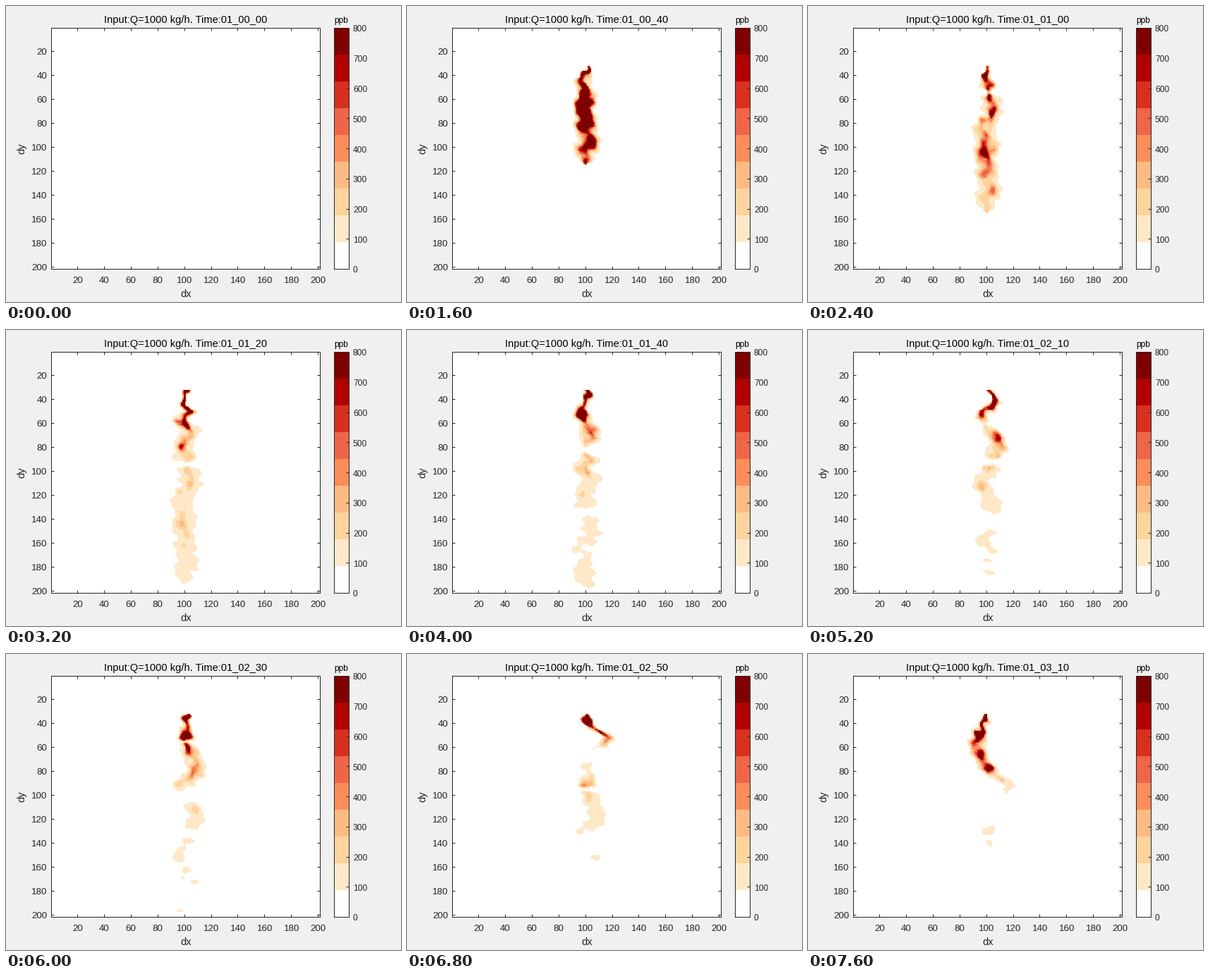
Write a matplotlib script that moves like this. It is 560 px wide and 420 px high and loops after 8000 ms.

```python
import numpy as np
import matplotlib.pyplot as plt
from matplotlib.animation import FuncAnimation
from matplotlib.colors import ListedColormap

W, H, DPI = 560, 420, 100
FRAMES, INTERVAL = 20, 400
SECONDS_PER_FRAME = 10
LEFT, RIGHT, TOP, BOTTOM = 64, 445, 31, 373
CELLS = 201
SOURCE_X, SOURCE_Y, OUTFLOW_Y = 255, 85.5, 367
WIND = 3.4               # pixels per simulated second
INK = "#262626"

plt.rcParams["font.family"] = "Liberation Sans"
cmap = ListedColormap(["#ffffff", "#fee8c8", "#fdd49e", "#fdbb84", "#fc8d59",
                       "#ef6548", "#d7301f", "#b30000", "#7f0000"])

# Sideways push (pixels) on gas by its release time (seconds).
SWAY = [(0, 1), (28, -3), (34, -5), (41, 8), (56, -3), (63, 5), (67, -3), (71, 7),
        (74, -8), (80, 6), (86, 2), (92, -9), (102, 12), (110, 15), (118, -12),
        (124, 11), (131, 13), (137, 2), (148, -2), (160, 30), (166, 6), (170, -8),
        (179, -16), (190, 0)]
# Release time and duration of the lulls that break the plume apart.
LULLS = [(49, 1.5), (75, 2.5), (100, 2), (116, 3), (138.5, 1), (152, 9)]

cell = (np.arange(CELLS) + 0.5) / CELLS
X, Y = np.meshgrid(LEFT + 0.5 + cell * (RIGHT - LEFT), TOP + 0.5 + cell * (BOTTOM - TOP))
AGE = np.maximum(Y - SOURCE_Y, 0) / WIND
WIDTH = 4 + 18 * (1 - np.exp(-AGE / 12))


def turbulence(seed, x, y, count=8):
    """Smooth noise of about unit strength: a sum of seeded plane waves."""
    rng = np.random.default_rng(seed)
    total = np.zeros_like(x)
    for _ in range(count):
        freq, angle, phase = rng.uniform(0.1, 0.45), *rng.uniform(0, 2 * np.pi, 2)
        total += np.sin(freq * (x * np.cos(angle) + y * np.sin(angle)) + phase)
    return total * np.sqrt(2 / count)


def concentration(k):
    """Gas drifts downwind, so each row shows what was released AGE seconds ago."""
    now = SECONDS_PER_FRAME * k
    if now == 0:
        return np.zeros_like(X)
    born = now - AGE
    drifted_y = Y - WIND * now

    sway = np.interp(born, *zip(*SWAY)) * (1 - np.exp(-AGE / 3))
    front = np.sqrt(np.clip((born + 1.3) / 5, 1e-6, 1))
    dx = X - SOURCE_X - sway + 2.5 * turbulence(1, X, drifted_y)
    r = dx / (WIDTH * front)

    burst = 1 + 4 / (1 + np.exp((born - 28) / 1.5))
    core = 1800 * burst * np.exp(-AGE / 13 - (r / 0.42) ** 2)
    core *= np.exp(0.45 * turbulence(2, X, drifted_y))
    lifetime = np.clip(200 - born, 100, 200)
    haze = (125 + 20 * np.exp(-born / 50)) * np.exp(-AGE / lifetime - r ** 4)
    haze *= np.exp(0.12 * turbulence(3, X, drifted_y))

    field = core + haze
    for start, span in LULLS:
        field *= 1 - 0.9 * np.minimum(AGE / 12, 1) * np.exp(-((born - start) / span) ** 2)
    return np.where((Y > SOURCE_Y) & (Y < OUTFLOW_Y) & (born > -1.3), field, 0)


fig = plt.figure(figsize=(W / DPI, H / DPI), dpi=DPI, facecolor="#f0f0f0")


def pixel_axes(x0, y0, x1, y1):
    return fig.add_axes([x0 / W, 1 - y1 / H, (x1 - x0) / W, (y1 - y0) / H])


def style(ax):
    ax.tick_params(direction="in", length=2.9, width=0.72, color=INK,
                   labelleft=False, labelbottom=False, labelright=False)
    for spine in ax.spines.values():
        spine.set(linewidth=0.72, color=INK)


def label(x, y, text, px, color=INK, **kw):
    kw = {"ha": "center", "va": "baseline", **kw}
    return fig.text(x / W, 1 - y / H, text, fontsize=px * 72 / DPI, color=color, **kw)


ax = pixel_axes(LEFT, TOP, RIGHT, BOTTOM)
edge = CELLS + 0.5
image = ax.imshow(np.zeros((CELLS, CELLS)), cmap=cmap, vmin=0, vmax=800, aspect="auto",
                  interpolation="nearest", extent=(0.5, edge, edge, 0.5))
ticks = range(20, 201, 20)
ax.set_xticks(ticks)
ax.set_yticks(ticks)
style(ax)
ax.tick_params(top=True, right=True)
for t in ticks:
    f = (t - 0.5) / CELLS
    label(LEFT + 0.5 + f * (RIGHT - LEFT), 393, str(t), 13.33)
    label(58.5, TOP + f * (BOTTOM - TOP) + 5, str(t), 13.33, ha="right")

bar = pixel_axes(465, TOP, 486, BOTTOM)
bar.imshow(np.arange(9)[:, None], cmap=cmap, aspect="auto", origin="lower",
           interpolation="nearest", extent=(0, 1, 0, 800))
bar.set_xticks([])
bar.set_yticks(range(0, 801, 100))
style(bar)
bar.tick_params(left=False, right=True)
for t in range(0, 801, 100):
    label(492, BOTTOM - t / 800 * (BOTTOM - TOP) + 5.5, str(t), 12, ha="left")

label(475.5, 24, "ppb", 12, "black")
label(255, 413, "dx", 14.67)
label(22, 202, "dy", 14.67, rotation=90, va="center")
title = label(255, 24, "", 14.67, "black")


def update(k):
    minutes, seconds = divmod(SECONDS_PER_FRAME * k, 60)
    title.set_text(f"Input:Q=1000 kg/h. Time:01_{minutes:02d}_{seconds:02d}")
    image.set_data(concentration(k))
    return image, title


anim = FuncAnimation(fig, update, frames=FRAMES, interval=INTERVAL,
                     repeat=True, repeat_delay=0, blit=False)
plt.show()
```
